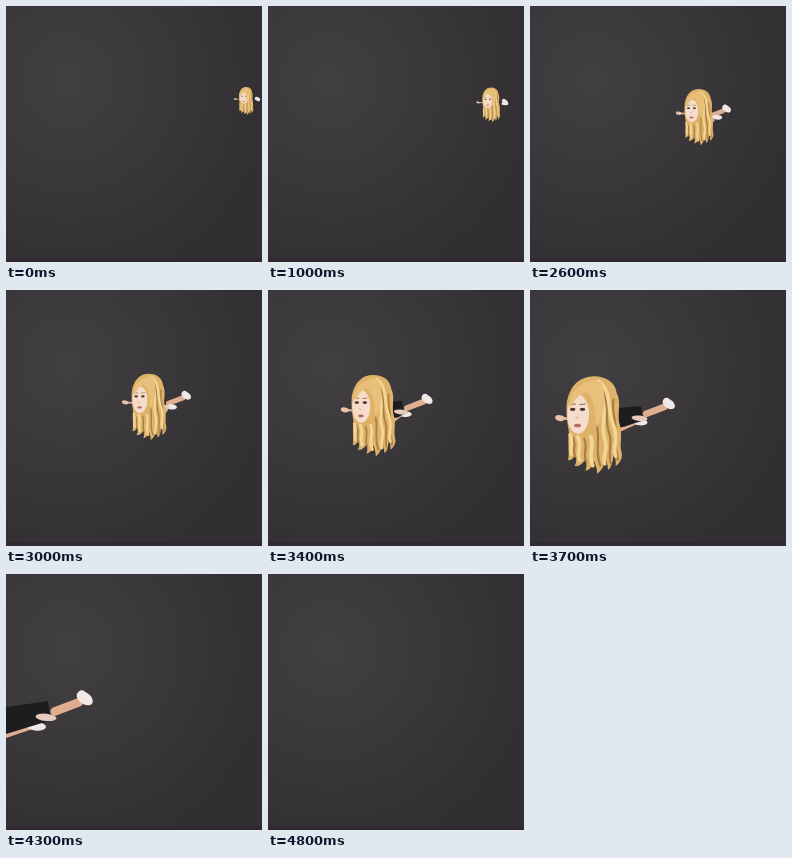
Recreate the animation shown at these times as an HTML page with a canvas. Size 256 by 256 pixels, loop 4900 ms.

```html
<!DOCTYPE html>
<html>
<head>
<meta charset="utf-8">
<style>
html, body { margin: 0; width: 100%; height: 100%; overflow: hidden; background: #333134; }
canvas { display: block; }
</style>
</head>
<body>
<canvas id="stage" width="256" height="256"></canvas>
<script>
const c = document.getElementById('stage').getContext('2d');
const LOOP = 4900, STEP = 100;
const SKIN = '#dfae90', SHOE = '#efe8e4', DARK = '#1d1c1f';

// Head shapes use units of one hundredth of the head height.
const hair = new Path2D('M2-50C14-50 22-43 23-33C28-23 23-10 26 0C29 10 25 20 28 30C28 36 25 40 22 42C23 36 21 32 20 30C20 38 18 44 15 46C15 40 13 36 12 34C12 42 9 47 5 50C5 44 3 40 2 37C1 43-2 46-6 47C-4 42-5 38-6 35C-8 40-12 43-16 42C-13 37-15 33-15 30C-17 34-19 37-22 36C-20 27-23 17-21 8C-23-4-24-14-23-24C-20-41-11-50 2-50Z');
const darkStrands = new Path2D('M8-40C18-24 11-8 16 8C20 20 14 28 18 40M4 0C9 14 2 24 8 42M-7 14C-3 24-9 28-5 38M-18 12C-13 20-19 26-15 33M20-26C18-8 25 0 21 14C20 24 25 28 24 36');
const lightStrands = new Path2D('M6-45C19-36 14-14 20 0C25 12 19 22 22 32M10-24C14-10 8 2 12 14C16 26 9 32 12 40M-1 12C3 22-4 30 1 42M-13 12C-8 22-15 28-11 36M-20 10C-17 18-21 24-19 30');
const fringe = new Path2D('M2-46C-14-42-21-32-21-16C-17-24-12-31-6-34C2-28 5-14 3 4C12-8 15-32 8-44Z');

const backdrop = c.createRadialGradient(62, 75, 0, 62, 75, 215);
backdrop.addColorStop(0, '#413f42');
backdrop.addColorStop(0.5, '#39373a');
backdrop.addColorStop(0.9, '#323033');
backdrop.addColorStop(1, '#312f32');

function ellipse(x, y, rx, ry, fill, turn = 0) {
  c.fillStyle = fill;
  c.beginPath();
  c.ellipse(x, y, rx, ry, turn, 0, 7);
  c.fill();
}

function line(x1, y1, x2, y2, width, color) {
  c.strokeStyle = color;
  c.lineWidth = width;
  c.beginPath();
  c.moveTo(x1, y1);
  c.lineTo(x2, y2);
  c.stroke();
}

function strands(path, color, width) {
  c.strokeStyle = color;
  c.lineWidth = width;
  c.stroke(path);
}

function drawBody(x, y, h, b, t) {
  const kick = 5 * Math.exp(-(((t - 4000) / 250) ** 2));
  const footX = 327 - b * 1.035, footY = 80 + b * 0.18 + kick;
  const kneeX = footX - b * 0.125, kneeY = footY + b * 0.055;
  const lowX = footX - Math.max(0, b - 98) * 0.34, lowY = footY + (b - 75) * 0.17;
  const r = b * 0.04;

  if (b > 110) {
    line(x + h * 0.27, y + h * 0.05, lowX - b * 0.03, lowY, b * 0.03, SKIN);
    line(kneeX, kneeY, footX - r * 0.6, footY + r * 0.4, b * 0.036, SKIN);
  }
  ellipse(lowX, lowY, b * 0.04, b * 0.018, SHOE, 0.05);

  c.fillStyle = DARK;
  c.beginPath();
  c.moveTo(x + h * 0.1, y - h * 0.16);
  c.lineTo(kneeX - r * 0.7, kneeY - r * 1.1);
  c.lineTo(kneeX - r * 0.4, kneeY + r * 0.9);
  c.lineTo(x + h * 0.33, y + h * 0.02);
  c.lineTo(x + h * 0.1, y + h * 0.06);
  c.fill();
  if (b > 110) ellipse(kneeX - r * 0.9, kneeY + r * 0.6, r * 1.1, r * 0.38, '#e4cbbb', 0.1);

  ellipse(footX, footY, b * 0.038, b * 0.024, SHOE, 0.6);
  ellipse(footX - b * 0.012, footY - b * 0.016, b * 0.017, b * 0.018, SHOE);
}

function drawHead(x, y, h, t) {
  const turn = t / 3400;
  const handX = x - h * (0.37 - 0.04 * turn), handY = y - h * 0.07;
  line(handX, handY, x - h * 0.2, y - h * 0.06, h * 0.03, SKIN);
  ellipse(handX, handY, h * 0.05, h * 0.03, '#e9c1a9', 0.2);

  c.save();
  c.translate(x, y);
  c.scale(h / 100 * (1 + 0.2 * (t / 4000) ** 8), h / 100);
  c.fillStyle = '#dfb26a';
  c.fill(hair);
  strands(darkStrands, '#a97d45', 2);
  strands(lightStrands, '#f3d594', 3.4);

  const fx = -5 - 7 * turn, w = 15 - 4.5 * turn;
  ellipse(fx, -11, w, 20, '#f6dccb');
  for (const side of [-0.5, 0.4]) {
    const ex = fx + side * w;
    ellipse(ex, -16, 2.6, 1.7, '#45352f');
    line(ex - 2.5, -21, ex + 2.5, -21.5, 1, '#94693f');
  }
  line(fx - 2, -8, fx, -7, 1, '#d49f86');
  ellipse(fx - 0.5, 0.5, w * 0.32, 1.8, '#b9695e');
  c.fillStyle = '#e8c07a';
  c.fill(fringe);
  c.restore();
}

function draw(now) {
  const t = Math.floor(now % LOOP / STEP) * STEP;
  c.fillStyle = backdrop;
  c.fillRect(0, 0, 256, 256);
  c.fillStyle = '#30292f';
  c.fillRect(0, 252, 256, 4);

  // Head and feet approach the viewer at different depths.
  const h = 145330 / (5190 - t), b = 451000 / (6180 - t);
  const x = 239.5 - 2.556 * (h - 28), y = 95 + 0.574 * (h - 28);
  c.lineCap = c.lineJoin = 'round';
  if (t < 4800) {
    drawBody(x, y, h, b, t);
    drawHead(x, y, h, t);
  }
}

const start = performance.now();
function tick() {
  draw(performance.now() - start);
  requestAnimationFrame(tick);
}
tick();
</script>
</body>
</html>
```
